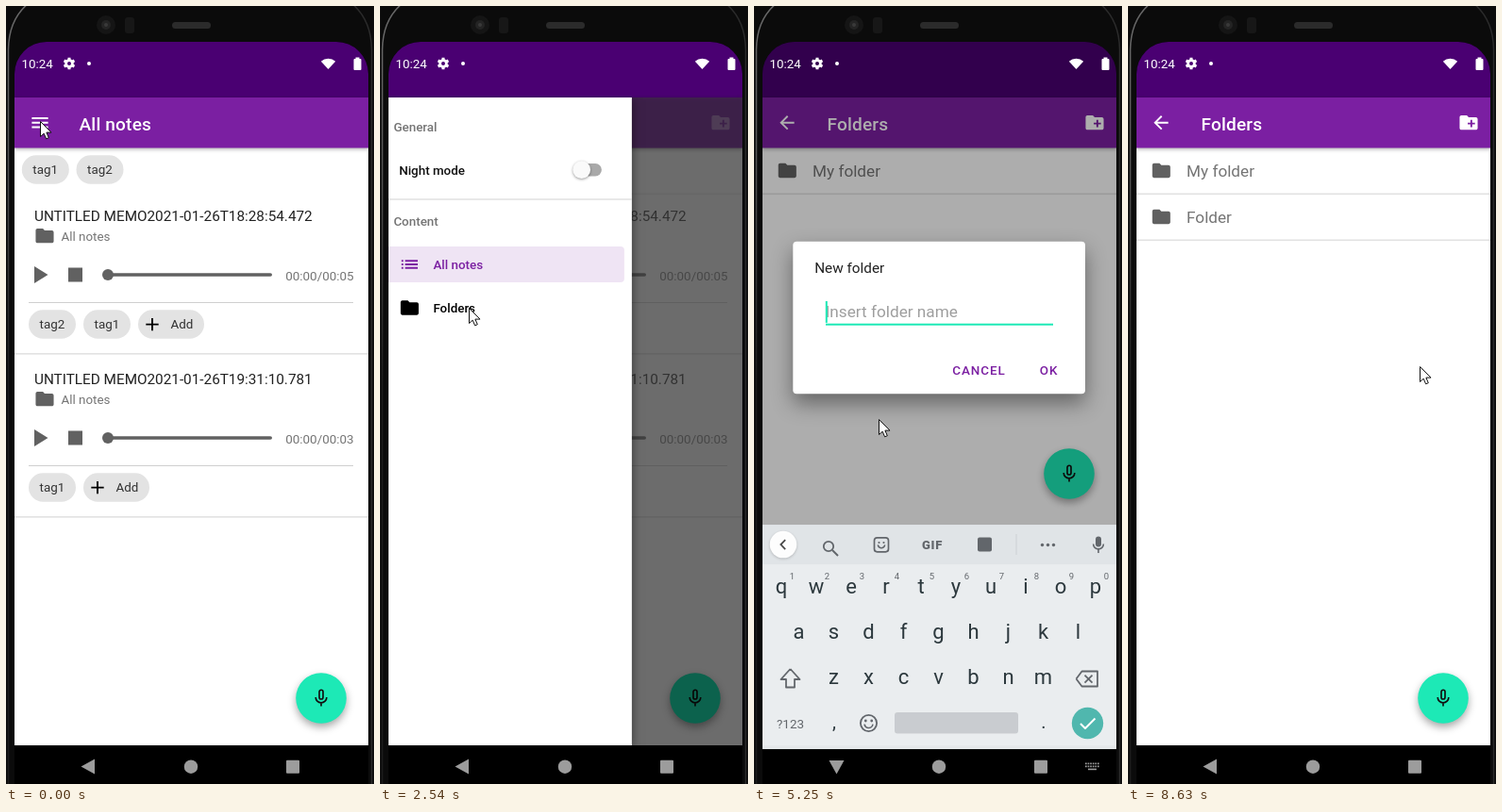
Write an HTML page with a canvas that moves like this. It is 390 px wide and 825 px high and loops after 9.1 s.

```html
<!DOCTYPE html>
<html lang="en">
<head>
<meta charset="utf-8">
<title>Voice notes: add a folder</title>
<style>
html, body { margin: 0; width: 100%; height: 100%; overflow: hidden; background: #000; }
canvas { display: block; width: 390px; height: 825px; }
</style>
</head>
<body>
<canvas id="stage"></canvas>
<script>
const W = 390, H = 825, LOOP = 9100, DP = 0.955, TAU = Math.PI * 2;
const PURPLE = '#7b1fa2', DEEP = '#4a0072', TEAL = '#1de9b6', GREY = '#757575', ICON = '#616161';
const canvas = document.getElementById('stage');
const dpr = window.devicePixelRatio || 1;
canvas.width = W * dpr;
canvas.height = H * dpr;
const g = canvas.getContext('2d');

const FOLDER = new Path2D('M10 4H4c-1.1 0-2 .9-2 2v12c0 1.1.9 2 2 2h16c1.1 0 2-.9 2-2V8c0-1.1-.9-2-2-2h-8z');
const NEW_FOLDER = new Path2D('M20 6h-8l-2-2H4c-1.1 0-2 .9-2 2v12c0 1.1.9 2 2 2h16c1.1 0 2-.9 2-2V8c0-1.1-.9-2-2-2zm-1 8h-3v3h-2v-3h-3v-2h3V9h2v3h3z');
const BACK = new Path2D('M20 11H7.83l5.59-5.59L12 4l-8 8 8 8 1.41-1.41L7.83 13H20z');
const MENU = new Path2D('M3 6h18v2H3zM3 11h18v2H3zM3 16h18v2H3z');
const LIST = new Path2D('M3 7h2v2H3zM3 11h2v2H3zM3 15h2v2H3zM7 7h14v2H7zM7 11h14v2H7zM7 15h14v2H7z');
const PLUS = new Path2D('M11 5h2v6h6v2h-6v6h-2v-6H5v-2h6z');
const MIC = new Path2D('M12 2.85a2.1 2.1 0 0 1 2.1 2.1v6a2.1 2.1 0 0 1-4.2 0v-6a2.1 2.1 0 0 1 2.1-2.1zM5.9 11a6.1 6.1 0 0 0 12.2 0M12 17v4');
const POINTER = new Path2D('M.5.5V16.5L4.2 13.2 6.6 18.8 9.3 17.7 6.9 12.1H12z');

const clamp = v => Math.max(0, Math.min(1, v));
const ramp = (t, a, b) => clamp((t - a) / (b - a));
const mix = (a, b, p) => a + (b - a) * p;
const easeOut = p => 1 - (1 - p) ** 3;
const smooth = p => p * p * (3 - 2 * p);

function rect(x, y, w, h, color) {
  g.fillStyle = color;
  g.fillRect(x, y, w, h);
}
function round(x, y, w, h, r, color) {
  g.fillStyle = color;
  g.beginPath();
  g.roundRect(x, y, w, h, r);
  g.fill();
}
function disc(x, y, r, color) {
  g.fillStyle = color;
  g.beginPath();
  g.arc(x, y, r, 0, TAU);
  g.fill();
}
function poly(points, color) {
  g.fillStyle = color;
  g.beginPath();
  points.forEach(([x, y]) => g.lineTo(x, y));
  g.fill();
}
function line(points, color, width = 1.8) {
  g.strokeStyle = color;
  g.lineWidth = width;
  g.beginPath();
  points.forEach(([x, y]) => g.lineTo(x, y));
  g.stroke();
}
function ring(x, y, r, color, width = 1.8, from = 0, to = TAU) {
  g.strokeStyle = color;
  g.lineWidth = width;
  g.beginPath();
  g.arc(x, y, r, from, to);
  g.stroke();
}
function text(s, x, y, size, color, { weight = 400, align = 'left', gap = 0 } = {}) {
  g.font = `${weight} ${size}px Roboto, "Noto Sans", sans-serif`;
  g.letterSpacing = gap + 'px';
  g.textAlign = align;
  g.fillStyle = color;
  g.fillText(s, x, y);
}
function icon(path, x, y, color, { stroke = 0, scale = DP } = {}) {
  g.save();
  g.translate(x, y);
  g.scale(scale, scale);
  g.translate(-12, -12);
  if (stroke) {
    g.lineWidth = stroke;
    g.strokeStyle = color;
    g.stroke(path);
  } else {
    g.fillStyle = color;
    g.fill(path);
  }
  g.restore();
}
function layer(alpha, draw) {
  if (alpha <= 0) return;
  g.save();
  g.globalAlpha *= alpha;
  draw();
  g.restore();
}
function shadow(color, blur, dy) {
  g.shadowColor = color;
  g.shadowBlur = blur * dpr;
  g.shadowOffsetY = dy * dpr;
}

function phone() {
  rect(0, 0, W, H, '#0b0b0b');
  const edge = g.createLinearGradient(0, 0, 0, 400);
  edge.addColorStop(0, '#6a6a6a');
  edge.addColorStop(0.4, '#555');
  edge.addColorStop(1, '#1c1c1c');
  for (const [x, dir, color] of [[0, 1, edge], [W, -1, '#2b2b2b']]) {
    g.save();
    g.translate(x, 0);
    g.scale(dir, 1);
    g.strokeStyle = color;
    g.lineWidth = 1.5;
    g.stroke(new Path2D('M2.5 825V46Q3 14 24 -3'));
    g.restore();
  }
  disc(106, 20, 10, '#151515');
  disc(106, 20, 5, '#242424');
  disc(106, 20, 2, '#3a3a3a');
  round(126, 12, 10, 17, 3, '#171717');
  round(176, 17, 41, 7, 3.5, '#2b2b2b');
}

function statusIcons() {
  text('10:24', 16.5, 66.3, 13.4, '#fff');
  ring(67, 61, 3.4, '#fff', 2.8);
  for (let i = 0; i < 6; i++) {
    const a = (i + 0.5) * TAU / 6, c = Math.cos(a), s = Math.sin(a);
    line([[67 + c * 4, 61 + s * 4], [67 + c * 6.3, 61 + s * 6.3]], '#fff', 3);
  }
  disc(88, 61, 2, '#fff');
  g.fillStyle = '#fff';
  g.beginPath();
  g.moveTo(341.5, 67);
  g.arc(341.5, 67, 11.2, -TAU * 0.37, -TAU * 0.13);
  g.fill();
  round(368.5, 56, 8, 12, 1, '#fff');
  rect(370.5, 54.5, 4, 2, '#fff');
}

function toolbar(title, glyph) {
  g.save();
  shadow('rgba(0,0,0,.3)', 4, 1);
  rect(9, 97, 375, 53.5, PURPLE);
  g.restore();
  icon(glyph, glyph === MENU ? 36 : 35, 123.7, '#fff');
  text(title, 77.5, 131.5, 19.1, '#fff', { weight: 500, gap: 0.15 });
}

function chip(x, y, label) {
  const add = label === 'Add';
  round(x, y, add ? 70 : 50, 30.5, 15.25, '#e3e3e3');
  if (add) icon(PLUS, x + 15, y + 15.3, '#000');
  text(label, x + (add ? 34.5 : 11.5), y + 20, 13.4, '#333');
}

function memo(dy, stamp, length, tags) {
  g.save();
  g.translate(0, dy);
  text('UNTITLED MEMO' + stamp, 30, 228, 15.3, '#212121');
  icon(FOLDER, 41, 243.7, ICON);
  text('All notes', 58.5, 248.8, 13.4, GREY);
  poly([[30, 276], [44.5, 285], [30, 294]], ICON);
  rect(66, 277.5, 15, 15, ICON);
  round(108, 283.2, 174, 3.6, 1.8, ICON);
  disc(108, 285, 6, ICON);
  text('00:00/' + length, 368.5, 290.5, 13.4, GREY, { align: 'right' });
  rect(24, 314, 344, 1, '#cfcfcf');
  tags.forEach((tag, i) => chip(24 + i * 58, 322.3, tag));
  rect(9, 368, 375, 1.6, '#e2e2e2');
  g.restore();
}

function notesPage() {
  rect(9, 97, 375, 687, '#fff');
  chip(16.8, 158.3, 'tag1');
  chip(74.5, 158.3, 'tag2');
  memo(0, '2021-01-26T18:28:54.472', '00:05', ['tag2', 'tag1', 'Add']);
  memo(173, '2021-01-26T19:31:10.781', '00:03', ['tag1', 'Add']);
  toolbar('All notes', MENU);
}

function folderRow(y, name) {
  icon(FOLDER, 35.3, y + 24, ICON);
  text(name, 62, y + 30.8, 17.2, GREY);
  rect(9, y + 48, 375, 1.6, '#e2e2e2');
}

function foldersPage(t) {
  rect(9, 97, 375, 687, '#fff');
  folderRow(150.5, 'My folder');
  layer(ramp(t, 8300, 8460), () => folderRow(199.5, 'Folder'));
  toolbar('Folders', BACK);
  icon(NEW_FOLDER, 361, 123.7, '#fff');
}

function fab(y) {
  g.save();
  shadow('rgba(0,0,0,.35)', 8, 4);
  disc(334, y, 26.8, TEAL);
  g.restore();
  icon(MIC, 334, y, '#101010', { stroke: 1.75 });
}

function drawer(p) {
  if (p <= 0) return;
  rect(9, 97, 375, 687, `rgba(0,0,0,${0.6 * p})`);
  g.save();
  g.beginPath();
  g.rect(9, 97, 375, 687);
  g.clip();
  g.translate(-267.5 * (1 - p), 0);
  g.save();
  shadow('rgba(0,0,0,.5)', 10, 2);
  rect(9, 97, 267.5, 687, '#fff');
  g.restore();
  const bold = { weight: 500 };
  text('General', 24, 133, 13.4, GREY, bold);
  text('Night mode', 29.8, 178.8, 13.4, '#111', bold);
  round(216, 167, 28.5, 13.4, 6.7, '#a9a9a9');
  g.save();
  shadow('rgba(0,0,0,.4)', 3, 1);
  disc(223.3, 173.7, 9.4, '#fafafa');
  g.restore();
  rect(9, 204.5, 267.5, 1, '#d2d2d2');
  text('Content', 24, 233.3, 13.4, GREY, bold);
  round(16.5, 255, 252, 38, 4, '#efe4f4');
  icon(LIST, 41, 274, PURPLE);
  text('All notes', 66, 279, 13.4, PURPLE, bold);
  icon(FOLDER, 41, 320, '#000');
  text('Folders', 66, 325, 13.4, '#000', bold);
  g.restore();
}

// Time of each key press in the word.
const WORD = 'Folder', KEYS = [5780, 6020, 6260, 6340, 6500, 6580];
const HINTS = [['F', 'For', 'From'], ['Fo', 'For', 'Food'], ['Fol', 'Follow', 'Following'],
  ['Fold', 'Folder', 'Folding'], ['Folde', 'Folder', 'Folded'], ['Folder', 'Folders', 'Folderol']];
const FOCUS = 4980;
const typed = t => KEYS.filter(k => k <= t).length;

function dialog(t) {
  const shown = smooth(ramp(t, 3840, 4080)) * (1 - ramp(t, 8230, 8420));
  if (shown <= 0) return;
  const y = mix(360, 240.5, easeOut(ramp(t, 5050, 5400)));
  const n = typed(t), focused = t >= FOCUS;
  const scale = t < 5000 ? mix(0.92, 1, shown) : 1;
  layer(shown, () => {
    g.translate(196, y + 81);
    g.scale(scale, scale);
    g.translate(-196, -81);
    g.save();
    shadow('rgba(0,0,0,.42)', 22, 10);
    round(41.3, 0, 309.7, 161.5, 4, '#fff');
    g.restore();
    text('New folder', 64.2, 33.3, 15.3, '#212121');
    if (n) {
      const word = WORD.slice(0, n);
      text(word, 75.7, 80.7, 17.2, '#212121');
      rect(76, 82.6, g.measureText(word).width, 1, '#333');
    } else {
      text('Insert folder name', 75.7, 80.7, 17.2, '#9e9e9e');
    }
    rect(76, focused ? 87 : 87.2, 241, focused ? 2 : 1, focused ? TEAL : '#7d7d7d');
    const since = t - (n ? KEYS[n - 1] : FOCUS);
    if (focused && since % 1000 < 500) {
      const x = n ? 76 + g.measureText(WORD.slice(0, n)).width : 75.8;
      rect(x, 63.2, 2, 23, TEAL);
    }
    text('CANCEL', 210.3, 141.7, 13.4, PURPLE, { weight: 500, gap: 0.95 });
    text('OK', 302.8, 141.7, 13.4, PURPLE, { weight: 500, gap: 0.95 });
  });
}

function tools() {
  const c = '#5f6368';
  ring(79, 569, 5.2, c);
  line([[83, 573], [89, 579]], c, 2);
  g.strokeStyle = c;
  g.lineWidth = 1.7;
  g.beginPath();
  g.roundRect(127.5, 559.8, 15, 15, 3);
  g.stroke();
  disc(132.5, 565, 1.1, c);
  disc(137.5, 565, 1.1, c);
  ring(135, 567, 3.7, c, 1.5, 0.1, Math.PI - 0.1);
  text('GIF', 189, 571.6, 13, c, { weight: 900, align: 'center', gap: 0.7 });
  round(237, 559.5, 15, 15, 2, c);
  rect(277.5, 556, 1, 22, '#ccd0d3');
  [305.5, 311.5, 317.5].forEach(x => disc(x, 567.5, 1.7, c));
}

function keys() {
  const ink = '#263238', soft = '#5f6368', mid = { align: 'center' };
  const row = (letters, x, y) => [...letters].forEach((k, i) => text(k, x + i * 37, y, 22, ink, mid));
  row('qwertyuiop', 29, 619);
  [...'1234567890'].forEach((d, i) => text(d, 40.5 + i * 37, 604.3, 9.5, soft, mid));
  row('asdfghjkl', 47.5, 667.3);
  row('zxcvbnm', 84.5, 715.3);
  g.lineJoin = 'round';
  const shift = [[38.5, 699], [48.5, 710], [43, 710], [43, 718.5], [34, 718.5], [34, 710], [28.5, 710], [38.5, 699]];
  line(shift, soft);
  line([[341.5, 709.5], [347.5, 701.5], [364, 701.5], [364, 717.5], [347.5, 717.5], [341.5, 709.5]], soft);
  line([[350.5, 705.5], [358.5, 713.5]], soft);
  line([[358.5, 705.5], [350.5, 713.5]], soft);
  text('?123', 38.5, 761.5, 13.5, soft, mid);
  text(',', 85, 762, 20, ink, mid);
  ring(121.5, 756.5, 8.6, soft);
  disc(118.3, 754, 1.4, soft);
  disc(124.7, 754, 1.4, soft);
  ring(121.5, 757, 4.5, soft, 1.6, 0.15, Math.PI - 0.15);
  round(149, 745, 131, 22.5, 3, '#c9cccf');
  text('.', 307, 762, 20, ink, mid);
  disc(353.5, 756.5, 16.7, '#4db6ac');
  line([[346, 757], [351, 762], [361.5, 751.5]], '#fff', 2);
}

function keyboard(t) {
  const up = easeOut(ramp(t, 4980, 5400)), gone = ramp(t, 8260, 8480);
  const n = typed(t);
  layer(clamp(up * 1.02) * (1 - gone), () => {
    g.beginPath();
    g.rect(9, 400, 375, 390);
    g.clip();
    g.translate(0, 90 * (1 - up) + 90 * gone * gone);
    rect(9, 546, 375, 42, '#e2e6e9');
    rect(9, 588, 375, 196, '#eceff1');
    g.save();
    shadow('rgba(0,0,0,.2)', 3, 1);
    disc(31, 567, 14.3, '#fff');
    g.restore();
    const d = n ? 1 : -1;
    line([[31 - 2.2 * d, 562], [31 + 2.6 * d, 567], [31 - 2.2 * d, 572]], '#444');
    if (n) {
      HINTS[n - 1].forEach((w, i) => text(w, 92.5 + i * 102.5, 573.5, 17.2, '#5f6368', { align: 'center' }));
      rect(140.5, 555, 1, 24, '#c4c9cc');
      rect(249, 555, 1, 24, '#c4c9cc');
    } else {
      tools();
    }
    round(362, 558.5, 6, 11, 3, '#5f6368');
    ring(365, 566.5, 5.4, '#5f6368', 1.6, 0, Math.PI);
    rect(364.2, 572, 1.6, 4, '#5f6368');
    keys();
  });
}

function navBar(t) {
  const grey = '#9c9c9c';
  const typing = t >= 5040 && t < 8330;
  g.save();
  g.translate(87.5, 806.5);
  if (typing) g.rotate(-Math.PI / 2);
  poly([[-8, 0], [6.5, -8], [6.5, 8]], grey);
  g.restore();
  disc(196, 806.7, 7.2, grey);
  round(297, 799.7, 14, 14, 1, grey);
  if (!typing) return;
  for (let i = 0; i < 12; i++) rect(351 + (i % 6) * 2.6, 802.5 + Math.floor(i / 6) * 3, 1.7, 1.7, grey);
  rect(354, 808.6, 9, 1.6, grey);
}

// Pointer stops: time, x, y.
const PATH = [[80, 36, 122], [190, 36, 118], [1490, 36, 118], [1820, 94, 320], [2700, 94, 320],
  [3270, 362, 138], [3350, 374, 139], [3500, 374, 139], [3640, 360, 121], [3920, 360, 121],
  [4440, 169, 413], [4530, 169, 413], [4760, 150, 430], [5000, 150, 430], [5250, 132, 438], [5320, 132, 438],
  [5550, 145, 478], [6890, 145, 478], [6970, 145, 481], [7040, 145, 481], [7130, 145, 468], [7240, 145, 468],
  [7640, 378, 408], [8070, 309, 382]];

function pointer(t) {
  let i = PATH.findIndex(s => s[0] > t);
  if (i < 0) i = PATH.length;
  const a = PATH[Math.max(0, i - 1)], b = PATH[Math.min(i, PATH.length - 1)];
  const p = a === b ? 0 : smooth(ramp(t, a[0], b[0]));
  g.save();
  g.translate(mix(a[1], b[1], p), mix(a[2], b[2], p));
  g.fillStyle = '#fff';
  g.strokeStyle = '#111';
  g.lineWidth = 1;
  g.fill(POINTER);
  g.stroke(POINTER);
  g.restore();
}

function ripple(t, start, x, y, color) {
  const p = ramp(t, start, start + 350);
  if (p > 0 && p < 1) layer(0.2 * (1 - p), () => disc(x, y, mix(6, 20, easeOut(p)), color));
}

function draw(t) {
  g.setTransform(dpr, 0, 0, dpr, 0, 0);
  phone();
  g.save();
  g.beginPath();
  g.roundRect(9, 38, 375, 800, [34, 34, 0, 0]);
  g.clip();
  rect(9, 38, 375, 800, '#000');
  rect(9, 38, 375, 59, DEEP);
  const page = ramp(t, 2460, 2680);
  if (page < 1) notesPage();
  layer(page, () => foldersPage(t));
  fab(t >= 5040 && t < 8310 ? 496 : 734);
  ripple(t, 480, 36, 124, '#fff');
  ripple(t, 3680, 361, 124, '#fff');
  drawer(easeOut(ramp(t, 520, 1030)) * (1 - smooth(ramp(t, 2500, 2860))));
  const dim = ramp(t, 3800, 4060) * (1 - ramp(t, 8230, 8500));
  rect(9, 38, 375, 746, `rgba(0,0,0,${0.32 * dim})`);
  statusIcons();
  dialog(t);
  keyboard(t);
  navBar(t);
  g.restore();
  pointer(t);
}

const start = performance.now();
function frame(now) {
  draw(Math.max(0, now - start) % LOOP);
  requestAnimationFrame(frame);
}
draw(0);
requestAnimationFrame(frame);
</script>
</body>
</html>
```
